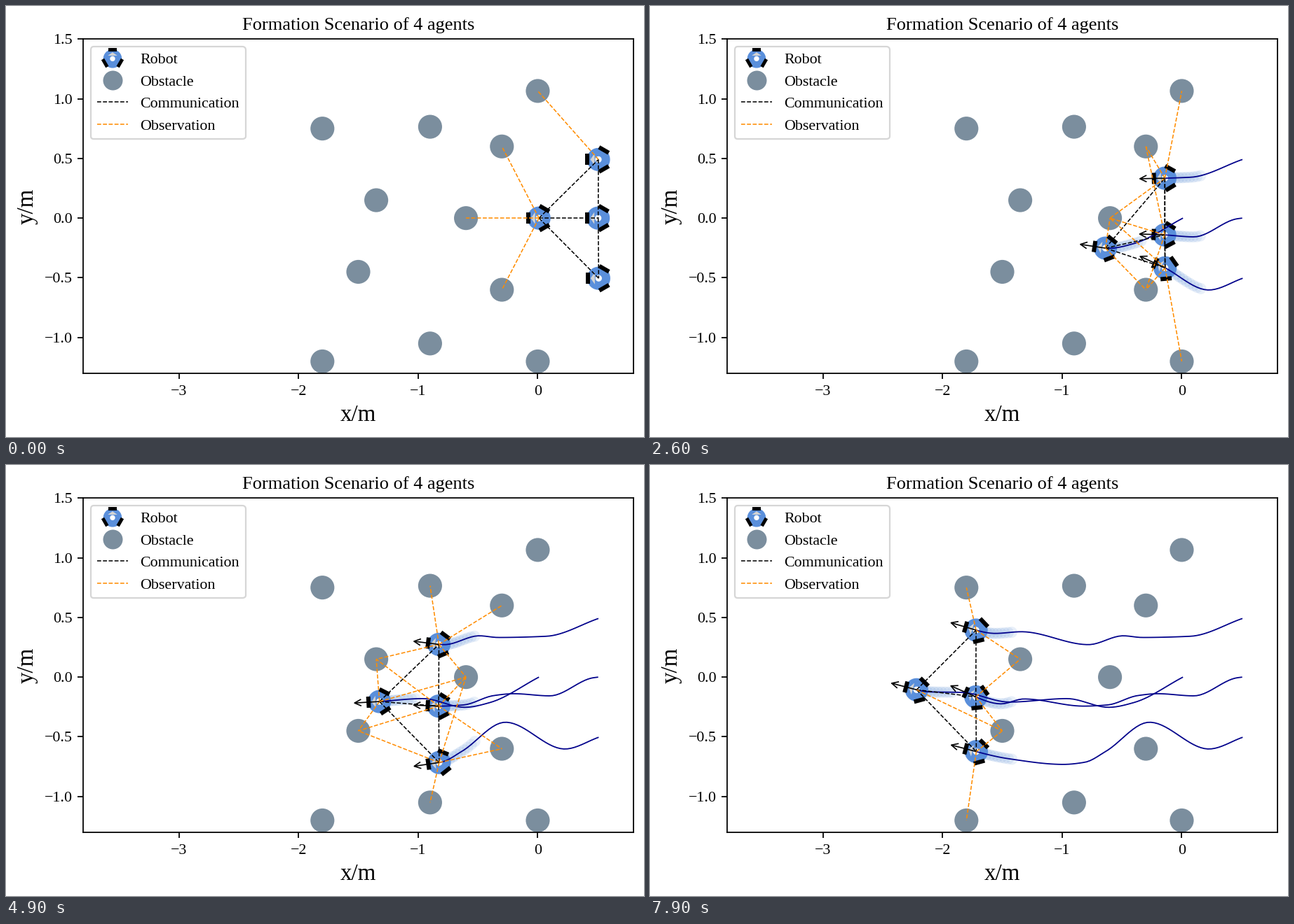
Animation of 910x616 px, one loop 8 s. Source, as a matplotlib script:

```python
import itertools

import numpy as np
import matplotlib.pyplot as plt
from matplotlib.animation import FuncAnimation
from matplotlib.collections import LineCollection, PolyCollection
from matplotlib.colors import to_rgba
from matplotlib.lines import Line2D

W, H, DPI = 910, 616, 160
LEFT, RIGHT, BOTTOM = 110, 895, 525    # plot area in pixels
UNIT = (RIGHT - LEFT) / 4.6            # pixels per metre
TOP = BOTTOM - 2.8 * UNIT

FRAMES, INTERVAL = 80, 100
SPEED, RAMP = 0.02977, 8.44            # cruise metres per frame, frames to reach it
REACH = 0.8                            # sensing and radio range in metres
GHOSTS = 10
PT = 0.99                              # font scale

BLUE, GREY, ORANGE = "#5a8fdb", "#7b8e9e", "darkorange"

OBSTACLES = np.array([
    (0, 1.065), (-0.9, 0.765), (-1.8, 0.75), (-0.3, 0.6), (-1.35, 0.15),
    (-0.6, 0), (-1.5, -0.45), (-0.3, -0.6), (-0.9, -1.05), (-1.8, -1.2), (0, -1.2)])


def path(*turns):
    """Monotone cubic y(x) through a few turning points, with its starting x."""
    x, y = np.array(turns[::-1]).T
    h, d = np.diff(x), np.diff(y) / np.diff(x)
    same = d[:-1] * d[1:] > 0
    inner = np.where(same, 2 * d[:-1] * d[1:] / np.where(same, d[:-1] + d[1:], 1), 0)
    m = np.concatenate([d[:1], inner, d[-1:]])

    def height(at):
        k = np.clip(np.searchsorted(x, at) - 1, 0, len(h) - 1)
        t = (at - x[k]) / h[k]
        bend = (1 - t) * (m[k] - d[k]) - t * (m[k + 1] - d[k])
        return y[k] + h[k] * t * (d[k] + (1 - t) * bend)

    return x[-1], height


PATHS = [
    path((0.01, 0), (-0.4, -0.213), (-0.61, -0.253), (-0.96, -0.18), (-1.44, -0.209),
         (-1.84, -0.128), (-2.1, -0.124), (-2.37, -0.066)),
    path((0.507, 0.491), (0.07, 0.342), (-0.33, 0.332), (-0.49, 0.346), (-0.78, 0.272),
         (-1.34, 0.38), (-1.56, 0.366), (-1.87, 0.436)),
    path((0.505, 0), (0.45, -0.008), (0.1, -0.157), (-0.2, -0.139), (-0.37, -0.155),
         (-0.62, -0.233), (-0.82, -0.243), (-1.32, -0.183), (-1.51, -0.224), (-1.87, -0.104)),
    path((0.509, -0.504), (0.226, -0.602), (-0.27, -0.378), (-0.635, -0.622), (-0.81, -0.713),
         (-0.99, -0.731), (-1.45, -0.683), (-1.87, -0.585)),
]


def positions(n):
    """Places of the four robots: even acceleration, then steady cruising."""
    d = SPEED * (n * n / (2 * RAMP) if n < RAMP else n - RAMP / 2)
    return np.array([(x0 - d, height(x0 - d)) for x0, height in PATHS])


def velocities(n):
    return (positions(n + 1.5) - positions(n)) / 1.5


def rotated(points, angle):
    c, s = np.cos(angle), np.sin(angle)
    return np.asarray(points) @ np.array([[c, s], [-s, c]])


def disc(radius):
    a = np.linspace(0, 2 * np.pi, 40, endpoint=False)
    return radius * np.column_stack([np.cos(a), np.sin(a)])


WHEEL = [(12.6, -8), (18.6, -8), (18.6, 8), (12.6, 8)]
PARTS = [(disc(16.6), BLUE)]
PARTS += [(rotated(WHEEL, a), "black") for a in np.radians([0, 120, 240])]
PARTS += [([(11.5, 0), (5.5, 8.5), (5.5, -8.5)], "lightgray"), (disc(4.6), "white")]
PART_COLORS = [color for _, color in PARTS]
GHOST = disc(8 / UNIT)


def robot(center, angle, scale=1.0):
    return [rotated(shape, angle) * scale / UNIT + center for shape, _ in PARTS]


plt.rcParams["font.family"] = "Liberation Serif"
plt.rcParams["font.size"] = 10 * PT
fig = plt.figure(figsize=(W / DPI, H / DPI), dpi=DPI, facecolor="white")
ax = fig.add_axes([LEFT / W, 1 - BOTTOM / H, (RIGHT - LEFT) / W, (BOTTOM - TOP) / H])
ax.set(xlim=(-3.8, 0.8), ylim=(-1.3, 1.5),
       xticks=[-3, -2, -1, 0], yticks=np.arange(-1, 1.6, 0.5))
ax.tick_params(axis="x", pad=4)
ax.set_title("Formation Scenario of 4 agents", fontsize=12 * PT)
ax.set_xlabel("x/m", fontsize=15 * PT)
ax.set_ylabel("y/m", fontsize=15 * PT)

for spot in OBSTACLES:
    ax.add_patch(plt.Circle(spot, 0.1, color=GREY, lw=0, zorder=1))


def add_lines(color, width, zorder, style="-"):
    return ax.add_collection(LineCollection(
        [], colors=color, linewidths=width, linestyles=style, zorder=zorder), autolim=False)


def add_polys(verts, colors, zorder):
    return ax.add_collection(PolyCollection(
        verts, facecolors=colors, edgecolors="none", zorder=zorder), autolim=False)


ghosts = add_polys([], "none", 2)
bodies = add_polys([], PART_COLORS * 4, 3)
trails = add_lines("darkblue", 0.8, 4)
radio = add_lines("black", 0.7, 4.2, "--")
sight = add_lines(ORANGE, 0.7, 4.4, "--")
arrows = add_lines("black", 0.75, 4.6)

ax.legend(handles=[
    Line2D([], [], ls="none", label="Robot"),
    Line2D([], [], ls="none", marker="o", ms=12.6, mew=0, color=GREY, label="Obstacle"),
    Line2D([], [], ls="--", lw=0.7, color="black", label="Communication"),
    Line2D([], [], ls="--", lw=0.7, color=ORANGE, label="Observation"),
], loc="upper left")
add_polys(robot((-3.554, 1.335), np.pi / 2, 0.8), PART_COLORS, 6)

TRACK = np.array([positions(n) for n in range(FRAMES)])


def near(a, b):
    return np.hypot(*(a - b)) < REACH


def arrow(start, vel):
    tip = start + 7 * vel
    barbs = rotated([(-9.5, 4.7), (0, 0), (-9.5, -4.7)], np.arctan2(vel[1], vel[0]))
    return [np.array([start, tip]), barbs / UNIT + tip]


def draw(n):
    now = TRACK[n]
    vel = velocities(n) if n else np.array([(-1.0, 0.0)] * 4)
    angles = np.arctan2(vel[:, 1], vel[:, 0])

    bodies.set_verts([p for c, a in zip(now, angles) for p in robot(c, a)])
    trails.set_segments([TRACK[:n + 1, i] for i in range(4)] if n else [])
    radio.set_segments([[a, b] for a, b in itertools.combinations(now, 2) if near(a, b)])
    sight.set_segments([[a, b] for a in now for b in OBSTACLES if near(a, b)])
    arrows.set_segments([s for c, v in zip(now, vel) for s in arrow(c, v)] if n else [])

    past = range(max(0, n - GHOSTS), n)
    ghosts.set_verts([GHOST + c for k in past for c in TRACK[k]])
    ghosts.set_facecolor([to_rgba("#94b6e4", 0.38 - 0.018 * (n - k))
                          for k in past for _ in range(4)])
    return ghosts, bodies, trails, radio, sight, arrows


anim = FuncAnimation(fig, draw, frames=FRAMES, interval=INTERVAL, repeat=True, blit=False)
plt.show()
```
